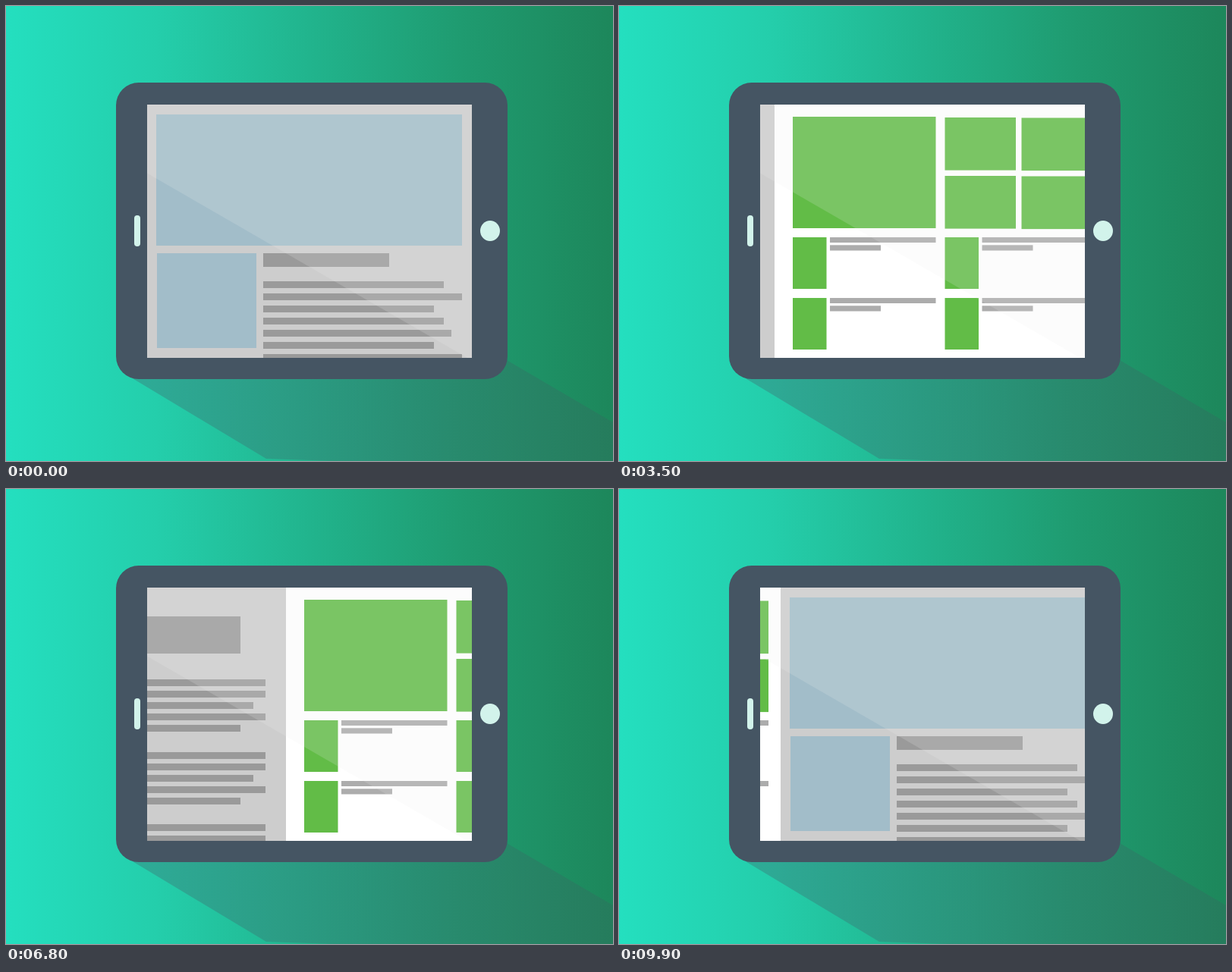
Write an HTML page that moves like this. It is 800 px wide and 600 px high and loops after 10 s.

```html
<!DOCTYPE html>
<html lang="en">
<head>
<meta charset="utf-8">
<title>Tablet swipe</title>
<style>
  html, body { margin: 0; width: 100%; height: 100%; overflow: hidden; }
  svg { display: block; width: 800px; height: 600px; }
</style>
</head>
<body>
<svg viewBox="0 0 800 600">
  <defs>
    <linearGradient id="sky">
      <stop offset="0" stop-color="#24dfbf"/>
      <stop offset=".25" stop-color="#24ceab"/>
      <stop offset=".5" stop-color="#21b48d"/>
      <stop offset=".75" stop-color="#1f9b70"/>
      <stop offset="1" stop-color="#1d875b"/>
    </linearGradient>
    <linearGradient id="shade">
      <stop offset="0" stop-color="#445562" stop-opacity=".31"/>
      <stop offset="1" stop-color="#445562" stop-opacity=".22"/>
    </linearGradient>
    <clipPath id="screen"><rect x="186" y="130" width="428" height="334"/></clipPath>
  </defs>
  <rect width="800" height="600" fill="url(#sky)"/>
  <path d="M165 490L343 597L432 600H800V549L660 467Z" fill="url(#shade)"/>
  <rect x="145" y="101" width="516" height="391" rx="30" fill="#455563"/>
  <rect x="169" y="276" width="8" height="41" rx="4" fill="#d2f3eb"/>
  <ellipse cx="638" cy="296.5" rx="13" ry="13.5" fill="#d2f3eb"/>
  <g clip-path="url(#screen)">
    <rect x="186" y="130" width="428" height="334" fill="#fff"/>
    <g id="strip"></g>
    <path d="M186 220.5V130H614V464H608Z" fill="#eee" fill-opacity=".172"/>
  </g>
</svg>
<script>
const BLUE = '#a2bdc9', GREEN = '#62bc47', PAPER = '#cdcdcd', INK = '#9a9a9a', LIGHT_INK = '#acacac';
const strip = document.getElementById('strip');

function makePage(x) {
  const page = document.createElementNS('http://www.w3.org/2000/svg', 'g');
  page.setAttribute('transform', `translate(${x} 0)`);
  strip.append(page);
  return (left, top, width, height, fill) => {
    const rect = document.createElementNS('http://www.w3.org/2000/svg', 'rect');
    const attrs = { x: left, y: top, width, height, fill };
    for (const key in attrs) rect.setAttribute(key, attrs[key]);
    page.append(rect);
  };
}

function drawArticle(box) {
  box(0, 130, 428, 334, PAPER);
  box(58, 168, 310, 49, INK);
  box(27, 250, 187, 214, BLUE);
  for (const top of [251, 347, 442])
    [175, 175, 159, 175, 142].forEach((width, i) => box(226, top + i * 15, width, 9, INK));
}

function drawGallery(box) {
  box(17, 146, 188.5, 147, GREEN);
  for (const [left, top] of [[217.5, 147], [318.5, 147.5], [217.5, 224], [318.5, 224.5]])
    box(left, top, 93.5, 69.6, GREEN);
  for (const [left, width] of [[17, 139.5], [217.5, 145.5]])
    for (const top of [305, 385]) {
      box(left, top, 44.5, 68, GREEN);
      box(left + 49, top, width, 7, LIGHT_INK);
      box(left + 49, top + 10.3, 67, 7.2, LIGHT_INK);
    }
}

function drawCover(box) {
  box(0, 130, 428, 334, PAPER);
  box(12, 143, 403, 173, BLUE);
  box(13, 326, 131, 125, BLUE);
  box(153, 326, 166, 18, INK);
  [238, 262, 225, 238, 248, 225, 262].forEach((width, i) => box(153, 363 + i * 16, width, 9, INK));
}

drawArticle(makePage(-249));
drawGallery(makePage(186));
drawCover(makePage(614));

// Each 2.5 s leg rests for 1 s, then slides in 16 equal steps of 100 ms.
const stops = [-428, -1, 435, 0, -428];

function offsetAt(ms) {
  const tick = Math.floor(ms / 100) % 100;
  const leg = Math.floor(tick / 25);
  const progress = Math.max(0, tick % 25 - 9) / 16;
  return Math.round(stops[leg] + (stops[leg + 1] - stops[leg]) * progress);
}

function render() {
  strip.setAttribute('transform', `translate(${offsetAt(performance.now())} 0)`);
  requestAnimationFrame(render);
}
render();
</script>
</body>
</html>
```
